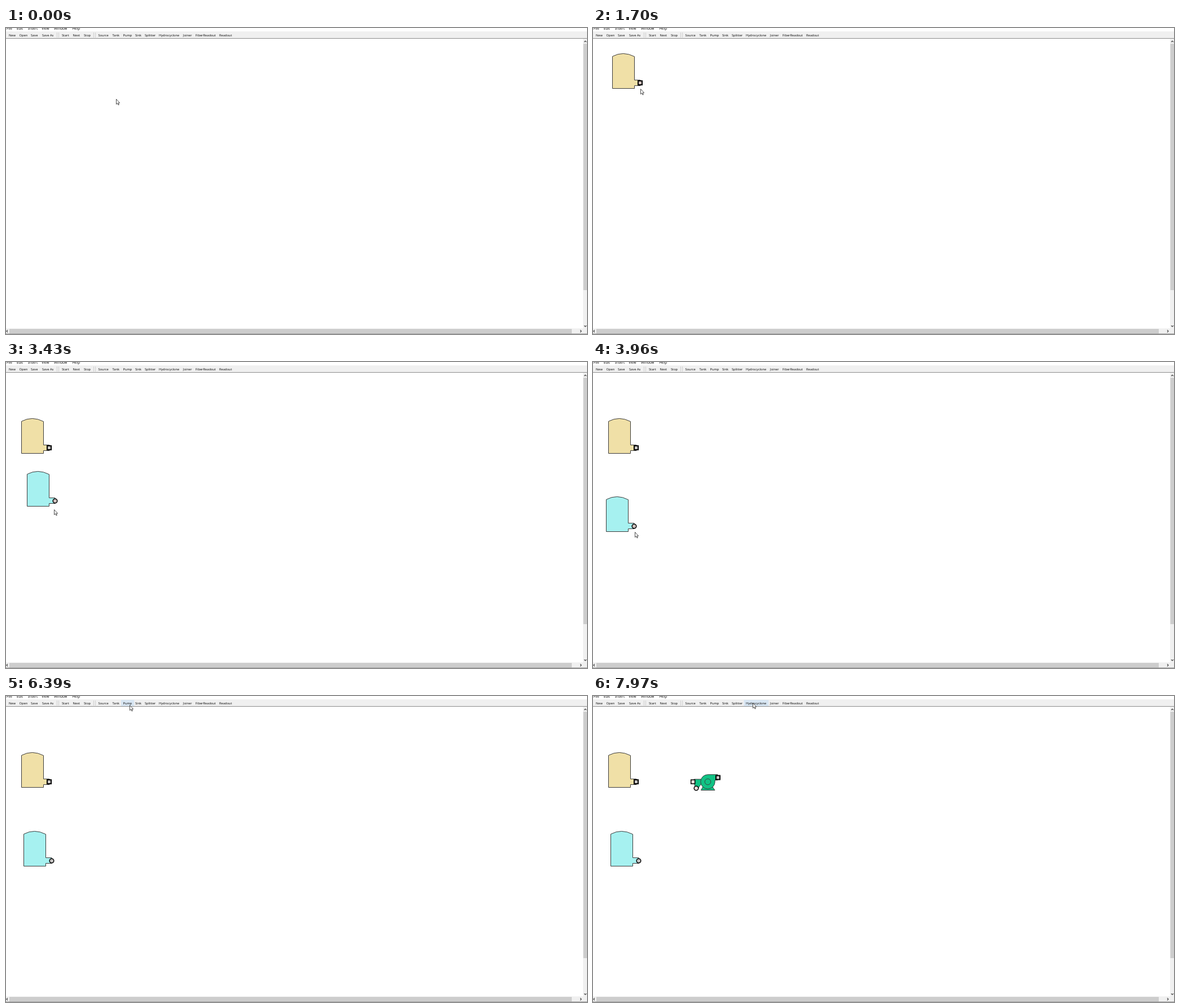
An HTML page for the animation above (8000 ms loop, 1030 by 544 pixels).

```html
<!DOCTYPE html>
<html lang="en">
<head>
<meta charset="utf-8">
<title>Flow sheet editor</title>
<style>
  html, body { margin: 0; width: 100%; height: 100%; overflow: hidden; background: #fff; }
  svg { display: block; width: 1030px; height: 544px; }
  text { font: 5.7px "Noto Sans", "Open Sans", sans-serif; fill: #111; }
  #menu text { font-size: 6.2px; }
  .body { stroke: #3c3c3c; }
  .port { fill: #cfc0bd; stroke: #000; stroke-width: 2; }
  .placed .port { fill: #c6c4c3; }
  .thin .port, .port.in { stroke-width: 1.5; }
  .port.in { fill: #eadcda; }
  .arrow { fill: none; stroke: #444; stroke-width: 1.1; }
</style>
</head>
<body>
<svg viewBox="0 0 1030 544">
  <defs>
    <clipPath id="sheet"><rect y="19" width="1023" height="515"/></clipPath>
    <path id="vessel" class="body" d="M.5 5.5Q19.5 -4.7 39.5 5.8V47.5H50V57.5H39.5V62.5H.5Z"/>
  </defs>

  <rect y="6" width="1030" height="12" fill="#f0f0f0"/>
  <rect y="18" width="1030" height="1" fill="#8c8c8c"/>
  <path d="M90.5 8V17M93.5 8V17M155.5 8V17M158.5 8V17" stroke="#cfcfcf"/>
  <rect id="hover" y="7" height="11" fill="#d8e6f3"/>
  <g id="menu"></g>
  <g id="tools"></g>

  <path d="M1023 19H1030V543H0V534H1023Z" fill="#f0f0f0"/>
  <path d="M1023.5 28H1030V466H1023.5ZM6 535H1003V543H6Z" fill="#cdcdcd"/>
  <rect y="543" width="1030" height="1" fill="#a5a5a5"/>
  <path class="arrow" d="M1025 25L1027 23L1029 25M1025 529L1027 531L1029 529M3 537L1 539L3 541M1018 537L1020 539L1018 541"/>

  <g clip-path="url(#sheet)">
    <g id="source">
      <use href="#vessel" fill="#f0e0a7"/>
      <rect class="port" x="46" y="49" width="7" height="7"/>
    </g>
    <g id="tank" class="thin">
      <use href="#vessel" fill="#a6f1f0"/>
      <circle class="port" cx="50" cy="53" r="3.8"/>
    </g>
    <g id="pump">
      <g class="body" fill="#10c284">
        <path d="M6 9H20V18H18L13 26H8Z"/>
        <path d="M22 22L18.5 28.5H43L38.5 22Z"/>
        <path d="M48 .7H30.5A12.7 12.7 0 1 0 43.2 13.4V10.5H48Z"/>
        <circle cx="30.5" cy="13.5" r="5.3"/>
      </g>
      <rect class="port in" x=".7" y="10" width="7" height="7"/>
      <circle class="port in" cx="10" cy="25" r="3.8"/>
      <rect class="port" x="45" y="2.5" width="7" height="7"/>
    </g>
  </g>

  <circle id="click" r="7" fill="#ffff3c"/>
  <path id="cursor" d="M.5 .5V9.6L2.6 7.7L4 10.9L5.4 10.3L4 7.2H6.6Z" fill="#fff" stroke="#222" stroke-width=".8"/>
</svg>
<script>
const LOOP = 8000;
const $ = id => document.getElementById(id);

const menu = { File: 1, Edit: 19, Insert: 39, View: 63, Window: 85, Help: 117.5 };
const tools = {
  New: 5, Open: 23.5, Save: 44, "Save As": 64, Start: 99, Next: 118.5, Stop: 138,
  Source: 163.5, Tank: 188.5, Pump: 207.5, Sink: 229, Splitter: 246,
  Hydrocyclone: 271, Joiner: 314, FiberReadout: 336, Readout: 378
};

function addLabels(group, labels, y) {
  return Object.entries(labels).map(([name, x]) => {
    const el = document.createElementNS("http://www.w3.org/2000/svg", "text");
    el.setAttribute("x", x);
    el.setAttribute("y", y);
    el.textContent = name;
    $(group).append(el);
    return { x, el };
  });
}
addLabels("menu", menu, 3);
const buttons = addLabels("tools", tools, 14.6);

// Pointer path: time, x, y
const path = [
  [0, 195, 126], [520, 195, 126], [1190, 169, 15], [1370, 169, 15],
  [1680, 84, 108], [1700, 84, 108], [2150, 76, 157], [2300, 77, 163], [2450, 77, 163],
  [2980, 196, 12], [3000, 196, 12], [3430, 85, 262], [3800, 67, 301],
  [4120, 81, 303], [4370, 81, 303], [4800, 118, 272], [5160, 237, 56],
  [5620, 277, 20], [6030, 277, 20], [6390, 219, 16], [6450, 216, 13],
  [6820, 209, 155], [7150, 221, 175], [7480, 217, 168], [7690, 217, 168],
  [7970, 283, 12], [8000, 283, 12]
];

// Monotone cubic interpolation: no overshoot, still at holds
function slope(i, k) {
  const rate = j => path[j] && path[j + 1]
    ? (path[j + 1][k] - path[j][k]) / (path[j + 1][0] - path[j][0]) : 0;
  const a = rate(i - 1), b = rate(i);
  return a * b > 0 ? 2 * a * b / (a + b) : 0;
}

function pointer(t) {
  const i = Math.max(0, path.findIndex(p => p[0] > t) - 1);
  const p = path[i], q = path[i + 1], d = q[0] - p[0], u = (t - p[0]) / d;
  return [1, 2].map(k =>
    p[k] + (q[k] - p[k]) * u * u * (3 - 2 * u)
    + d * u * (1 - u) * ((1 - u) * slope(i, k) - u * slope(i + 1, k)));
}

const items = [
  { id: "source", pick: 1370, drop: 2370, dx: 50, dy: 63 },
  { id: "tank", pick: 3000, drop: 4370, dx: 50, dy: 63 },
  { id: "pump", pick: 6450, drop: 7480, dx: 44, dy: 29 }
];
const clicks = [1370, 2340, 3000, 4370, 6450, 7370];
const LAG = 20, FLASH = 110;

const move = (el, x, y) => el.setAttribute("transform", `translate(${x} ${y})`);
const show = (el, on) => el.setAttribute("visibility", on ? "visible" : "hidden");

function draw(t) {
  const [x, y] = pointer(t);
  move($("cursor"), Math.round(x), Math.round(y));

  for (const { id, pick, drop, dx, dy } of items) {
    const [px, py] = pointer(Math.min(t, drop) - LAG);
    move($(id), Math.round(px - dx), Math.round(py - dy));
    show($(id), t > pick && py > 19);
    $(id).classList.toggle("placed", t > drop + FLASH);
  }

  const start = clicks.find(c => t >= c && t < c + FLASH);
  show($("click"), start !== undefined);
  move($("click"), x + .5, y + 1);
  $("click").setAttribute("opacity", .9 - .5 * (t - (start ?? t)) / FLASH);

  const over = y >= 7 && y < 18 && buttons.find(b => x >= b.x - 3.5 && x < b.x + b.width + 3.5);
  show($("hover"), over);
  if (over) {
    $("hover").setAttribute("x", over.x - 3.5);
    $("hover").setAttribute("width", over.width + 7.5);
  }
}

for (const b of buttons) b.width = b.el.getComputedTextLength();
const begin = performance.now();
function tick() {
  draw((performance.now() - begin) % LOOP);
  requestAnimationFrame(tick);
}
tick();
</script>
</body>
</html>
```
